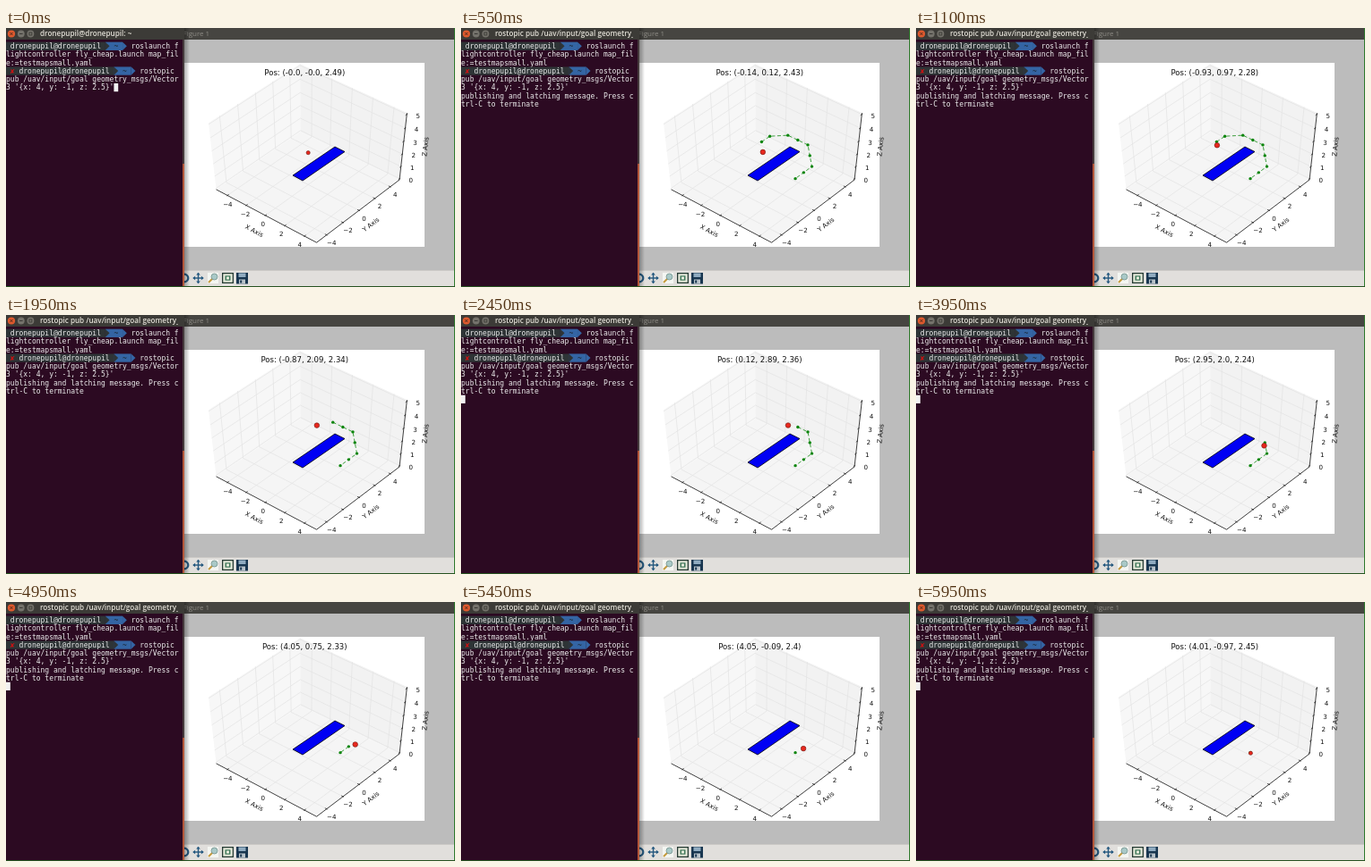
Recreate the animation shown at these times as an HTML page with a canvas. Size 501 by 290 pixels, loop 6000 ms.

```html
<!DOCTYPE html>
<html lang="en">
<head>
<meta charset="utf-8">
<title>Flight planner demo</title>
<style>
  html, body { margin: 0; width: 100%; height: 100%; overflow: hidden; background: #bcbcbc; }
  canvas { display: block; width: 501px; height: 290px; }
</style>
</head>
<body>
<canvas id="stage"></canvas>
<script>
const W = 501, H = 290, LOOP = 6000, STEP = 50;
const canvas = document.getElementById('stage');
const ctx = canvas.getContext('2d');
const ratio = window.devicePixelRatio || 1;
canvas.width = Math.round(W * ratio);
canvas.height = Math.round(H * ratio);

const MONO = '8px "DejaVu Sans Mono", monospace';
const PLOT = '"DejaVu Sans", sans-serif';
const UI = '"Open Sans", sans-serif';
const CHAR = 4.816, LINE = 9.25;
const USER = 'dronepupil@dronepupil';

// time, x, y, z of the vehicle
const FLIGHT = [
  [0, -0.001, -0.001, 2.49],
  [450, -0.003, -0.001, 2.48],
  [700, -0.34, 0.31, 2.36],
  [1100, -0.93, 0.97, 2.28],
  [1500, -1.02, 1.48, 2.3],
  [1950, -0.87, 2.09, 2.34],
  [2400, 0.02, 2.88, 2.36],
  [2950, 1.11, 2.97, 2.38],
  [3450, 2.05, 2.78, 2.31],
  [3950, 2.95, 2.0, 2.24],
  [4500, 3.88, 1.26, 2.28],
  [4950, 4.05, 0.75, 2.33],
  [5400, 4.06, 0.02, 2.4],
  [5800, 4.02, -0.86, 2.44],
  [5950, 4.01, -0.97, 2.45]
];

// x, y, time the waypoint is reached
const ROUTE = [
  [0, 0, 550], [-1, 1, 1200], [-1, 2, 1900], [0, 3, 2400], [1, 3, 2900],
  [2, 3, 3450], [3, 2, 4000], [4, 1, 4700], [4, 0, 5400], [4, -1, LOOP]
];
const ENTER = 100, PUBLISHED = 300, PLANNED = 400;

// Perspective camera: azimuth -50, elevation 50, distance 10
const RAD = Math.PI / 180;
const ca = Math.cos(50 * RAD), sa = Math.sin(50 * RAD);
const ce = ca, se = sa;

function project(x, y, z) {
  const a = x / 10, b = y / 10, c = z / 5 - 0.5;
  const depth = 10 - (ce * ca * a - ce * sa * b + se * c);
  const right = sa * a + ca * b;
  const up = -se * ca * a + se * sa * b + ce * c;
  return [337.2 + 1449 * right / depth, 139.5 - 1115 * up / depth];
}

function rect(x, y, w, h, fill) {
  ctx.fillStyle = fill;
  ctx.fillRect(x, y, w, h);
}

function trace(points, closed) {
  ctx.beginPath();
  points.forEach(([x, y]) => ctx.lineTo(x, y));
  if (closed) ctx.closePath();
}

function poly(points, fill) {
  trace(points, true);
  ctx.fillStyle = fill;
  ctx.fill();
}

function line(points, color, width = 0.7) {
  trace(points, false);
  ctx.strokeStyle = color;
  ctx.lineWidth = width;
  ctx.stroke();
}

function dot(x, y, r, fill) {
  ctx.beginPath();
  ctx.arc(x, y, r, 0, 7);
  ctx.fillStyle = fill;
  ctx.fill();
}

function text(str, x, y, font, fill, align = 'left') {
  ctx.font = font;
  ctx.fillStyle = fill;
  ctx.textAlign = align;
  ctx.fillText(str, x, y);
}

function turned(str, x, y, angle) {
  ctx.save();
  ctx.translate(x, y);
  ctx.rotate(angle * RAD);
  text(str, 0, 2.5, '7.1px ' + PLOT, '#111', 'center');
  ctx.restore();
}

const LO = -5.208, HI = 5.208, ZLO = -0.104, ZHI = 5.104;
const p = project;

function drawAxes() {
  rect(199, 39, 268, 206, '#fff');
  const back = [p(LO, HI, ZLO), p(LO, HI, ZHI)];
  poly([p(LO, LO, ZLO), p(LO, LO, ZHI), back[1], back[0]], '#f7f7f7');
  poly([p(HI, HI, ZLO), p(HI, HI, ZHI), back[1], back[0]], '#f2f2f2');
  poly([p(LO, LO, ZLO), p(HI, LO, ZLO), p(HI, HI, ZLO), back[0]], '#f5f5f5');

  const grid = '#e3e3e3';
  for (let v = -4; v <= 4; v += 2) {
    line([p(v, LO, ZLO), p(v, HI, ZLO), p(v, HI, ZHI)], grid);
    line([p(HI, v, ZLO), p(LO, v, ZLO), p(LO, v, ZHI)], grid);
  }
  for (let v = 0; v <= 5; v++) {
    line([p(LO, LO, v), p(LO, HI, v), p(HI, HI, v)], grid);
  }

  line([p(LO, LO, ZLO), p(HI, LO, ZLO), p(HI, HI, ZLO), p(HI, HI, ZHI)], '#111', 0.8);

  const label = (v, [x, y], dx, dy) =>
    text(String(v).replace('-', '\u2212'), x + dx, y + dy + 2.6, '7.1px ' + PLOT, '#111', 'center');
  for (let v = -4; v <= 4; v += 2) {
    line([p(v, LO - 0.08, ZLO), p(v, LO + 0.17, ZLO)], '#111');
    line([p(HI + 0.08, v, ZLO), p(HI - 0.17, v, ZLO)], '#111');
    label(v, p(v, LO, ZLO), -2.5 - 0.7 * v, 9.5);
    label(v, p(HI, v, ZLO), 5.5, 8.8);
  }
  for (let v = 0; v <= 5; v++) {
    line([p(HI, HI + 0.08, v), p(HI, HI - 0.17, v)], '#111');
    label(v, p(HI, HI, v), 12.5, 1.5);
  }
  turned('X Axis', 277, 227, 28);
  turned('Y Axis', 407, 220, -37);
  turned('Z Axis', 468, 133, -84);
}

function drawObstacle() {
  poly([[320, 165], [331, 171], [378, 138.5], [367, 133]], '#0000f4');
  ctx.strokeStyle = '#000';
  ctx.lineWidth = 0.8;
  ctx.stroke();
}

function vehicleAt(t) {
  let i = 1;
  while (i < FLIGHT.length - 1 && FLIGHT[i][0] < t) i++;
  const a = FLIGHT[i - 1], b = FLIGHT[i];
  const k = Math.min(1, (t - a[0]) / (b[0] - a[0]));
  return [1, 2, 3].map(n => a[n] + (b[n] - a[n]) * k);
}

const round2 = v => v.toFixed(2).replace(/0$/, '');

function drawFlight(t) {
  const pos = vehicleAt(t);
  text(`Pos: (${pos.map(round2).join(', ')})`, 333.3, 53, '8.54px ' + PLOT, '#111', 'center');

  if (t >= PLANNED) {
    const left = ROUTE.filter(w => t < w[2]).map(w => p(w[0], w[1], 2.5));
    ctx.setLineDash([4, 2.5]);
    line(left, '#2c962c', 0.9);
    ctx.setLineDash([]);
    left.forEach(([x, y]) => dot(x, y, 1.7, '#078407'));
  }

  const [x, y] = p(...pos);
  dot(x, y, t < 450 || t > 5700 ? 2.1 : 2.8, '#e8281e');
  ctx.strokeStyle = '#6b1a14';
  ctx.lineWidth = 0.6;
  ctx.stroke();
}

function drawToolbar() {
  rect(198, 271, 302, 18, '#e1dfdc');
  line([[198, 271.5], [500, 271.5]], '#cbc9c6', 1);
  const blue = '#24587f';

  // home, partly covered by the terminal
  ctx.beginPath();
  ctx.arc(199, 280, 4.3, -1.8, 1.9);
  ctx.strokeStyle = blue;
  ctx.lineWidth = 2.2;
  ctx.stroke();

  // pan
  line([[209, 280], [220, 280]], blue, 1.4);
  line([[214.5, 274.5], [214.5, 285.5]], blue, 1.4);
  for (let i = 0; i < 4; i++) {
    ctx.save();
    ctx.translate(214.5, 280);
    ctx.rotate(i * Math.PI / 2);
    poly([[6.3, 0], [3.4, -2.3], [3.4, 2.3]], blue);
    ctx.restore();
  }

  // zoom
  rect(225, 274, 12, 12, '#f4f6f2');
  line([[226, 285], [231, 280]], '#c49a3c', 2);
  dot(232.5, 278.5, 3.5, '#a9c9c7');
  ctx.strokeStyle = '#74918c';
  ctx.lineWidth = 0.8;
  ctx.stroke();

  // subplots
  rect(241, 274, 13, 12, '#263c34');
  rect(242.3, 275.3, 10.4, 9.4, '#e8ecdd');
  rect(244.5, 277.3, 6, 5.4, '#40785a');
  rect(246, 278.5, 3, 3, '#e8ecdd');

  // save
  rect(257, 274, 13, 12.5, '#183650');
  rect(259.5, 274.5, 8, 4.5, '#8fabc0');
  rect(260, 281.5, 7, 5, '#b9c3ca');
  rect(261.2, 282.5, 2, 3, '#183650');
}

function drawFigure(t) {
  rect(198, 0, 303, 290, '#bcbcbc');
  rect(198, 0, 303, 13, '#464541');
  text('Figure 1', 197.5, 9, '8px ' + UI, '#8e8c86');
  drawAxes();
  drawObstacle();
  drawFlight(t);
  drawToolbar();
  const shade = ctx.createLinearGradient(199, 0, 205, 0);
  shade.addColorStop(0, 'rgba(0,0,0,.3)');
  shade.addColorStop(1, 'rgba(0,0,0,0)');
  rect(199, 0, 6, 290, shade);
}

const baseline = row => 23 + row * LINE;
const write = (str, col, row, fill = '#ececec') =>
  text(str, col * CHAR, baseline(row), MONO, fill);

function prompt(row, col, failed) {
  const top = baseline(row) - 7.3, mid = top + LINE / 2, end = top + LINE;
  const a = (col + 22) * CHAR, b = (col + 26) * CHAR;
  const cap = (x, fill) => poly([[x, top], [x + CHAR, mid], [x, end]], fill);
  rect(a, top, b - a, LINE, '#3465a4');
  cap(b, '#3465a4');
  rect(0, top, a, LINE, '#2e3436');
  cap(a, '#2e3436');
  if (failed) write('\u2718', 1, row, '#d01212');
  write(USER, col, row);
  write('~', col + 24, row, '#1d2a38');
}

function drawTerminal(t) {
  rect(0, 0, 199, 290, '#2c0a22');
  rect(0, 0, 199, 13, '#3c3b37');
  dot(6, 6.5, 4.1, '#df5a2e');
  dot(16.8, 6.5, 3.9, '#74726b');
  dot(27.4, 6.5, 3.9, '#74726b');
  line([[4.4, 4.9], [7.6, 8.1]], '#4a2a1c', 0.9);
  line([[7.6, 4.9], [4.4, 8.1]], '#4a2a1c', 0.9);
  line([[15, 6.5], [18.6, 6.5]], '#33322e', 0.9);
  ctx.lineWidth = 0.8;
  ctx.strokeStyle = '#33322e';
  ctx.strokeRect(25.9, 5, 3, 3);

  const title = t < ENTER ? USER + ': ~' : 'rostopic pub /uav/input/goal geometry_';
  ctx.save();
  ctx.beginPath();
  ctx.rect(0, 0, 192, 13);
  ctx.clip();
  text(title, 38, 9.4, '600 8.15px ' + UI, '#e2dfd6');
  ctx.restore();

  prompt(0, 1, false);
  write('roslaunch f', 29, 0);
  write('lightcontroller fly_cheap.launch map_fil', 0, 1);
  write('e:=testmapsmall.yaml', 0, 2);
  prompt(3, 3, true);
  write('rostopic', 31, 3);
  write('pub /uav/input/goal geometry_msgs/Vector', 0, 4);
  write("3 '{x: 4, y: -1, z: 2.5}'", 0, 5);
  if (t >= PUBLISHED) {
    write('publishing and latching message. Press c', 0, 6);
    write('trl-C to terminate', 0, 7);
  }

  const blink = t % 1200;
  if (blink < 525 || blink >= 1125) {
    const [col, row] = t < ENTER ? [25, 5] : t < PUBLISHED ? [0, 6] : [0, 8];
    rect(col * CHAR, baseline(row) - 7.3, CHAR, LINE, '#f2f2f2');
  }

  rect(197, 13, 2, 277, '#453a3c');
  rect(197, 152, 2, 138, '#b4573a');
}

function draw(t) {
  ctx.setTransform(ratio, 0, 0, ratio, 0, 0);
  drawFigure(t);
  drawTerminal(t);
  rect(500, 0, 1, 290, '#2f7a2c');
  rect(0, 289, 501, 1, '#25521f');
}

const start = performance.now();
function tick() {
  const t = (performance.now() - start) % LOOP;
  draw(Math.floor(t / STEP) * STEP);
  requestAnimationFrame(tick);
}
tick();
</script>
</body>
</html>
```
